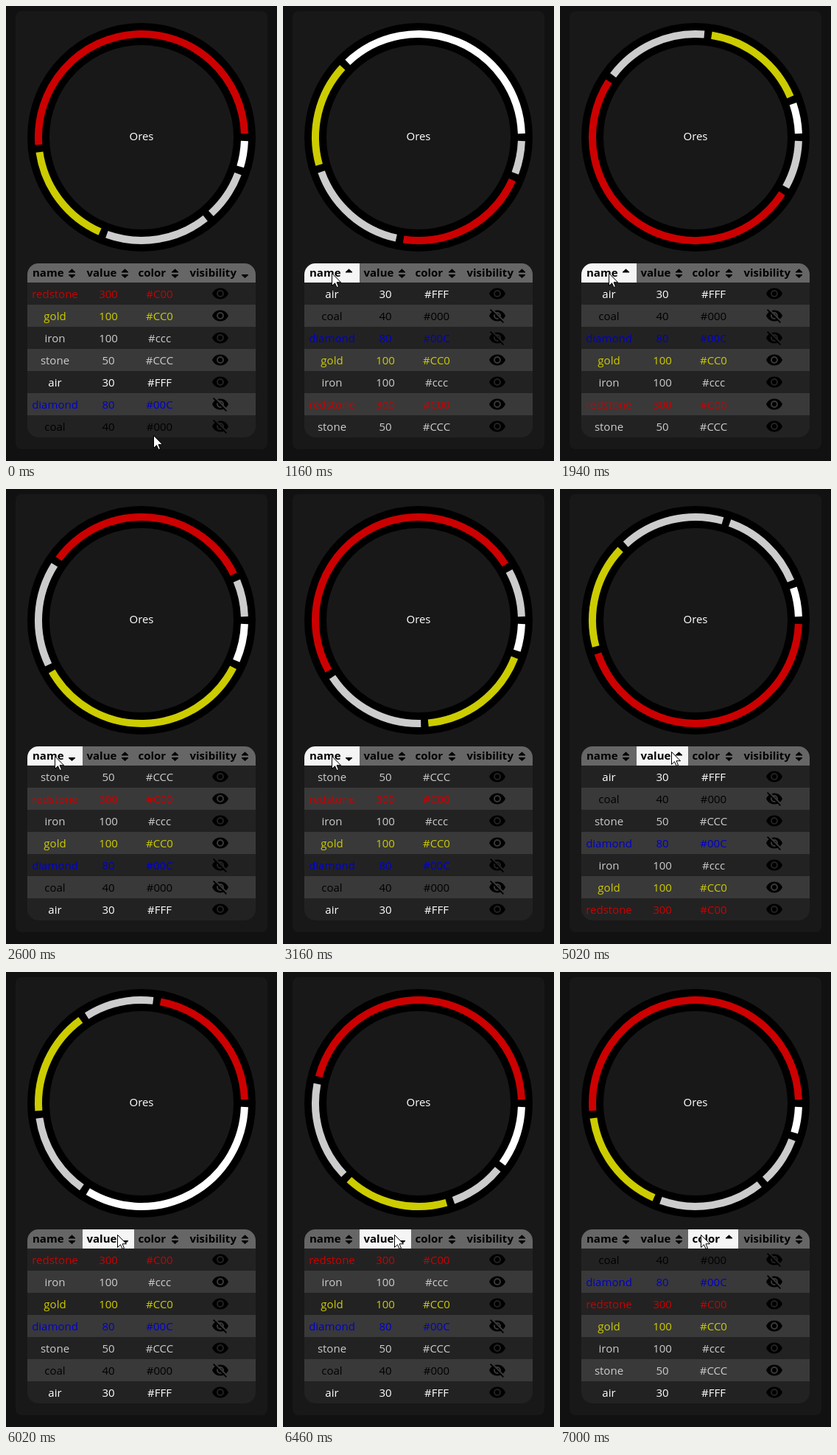
These frames come from a looping animation (368 px wide and 617 px high, 8 s). An HTML page:

```html
<!DOCTYPE html>
<html lang="en">
<head>
<meta charset="utf-8">
<title>Ores</title>
<style>
html, body { margin: 0; width: 100%; height: 100%; overflow: hidden; background: #111; }
svg { display: block; width: 368px; height: 617px; font: 15px "Open Sans", "Noto Sans", sans-serif; }
.mid { text-anchor: middle; }
.head { font-weight: 700; }
</style>
</head>
<body>
<svg id="stage" viewBox="0 0 368 617">
  <defs>
    <clipPath id="round"><rect x="29" y="349" width="310" height="236" rx="15"/></clipPath>
    <mask id="cut" maskUnits="userSpaceOnUse" x="0" y="0" width="24" height="24">
      <path d="M0 0H24V24H0Z" fill="#fff"/>
      <path d="M3 1.2L23.5 21.7" stroke="#000" stroke-width="2"/>
    </mask>
    <path id="eye" fill-rule="evenodd" d="M12 4.5C7 4.5 2.73 7.61 1 12c1.73 4.39 6 7.5 11 7.5s9.27-3.11 11-7.5C21.27 7.61 17 4.5 12 4.5ZM12 17a5 5 0 1 1 0-10a5 5 0 0 1 0 10ZM12 9a3 3 0 1 0 0 6a3 3 0 0 0 0-6Z"/>
    <g id="eyeOff">
      <use href="#eye" mask="url(#cut)"/>
      <path d="M2.6 3.6L20.4 21.4" stroke="#000" stroke-width="1.8"/>
    </g>
  </defs>
  <rect x="13" y="7" width="342" height="594" rx="8" fill="#181818"/>
  <circle cx="184" cy="178" r="140" fill="none" stroke="#000" stroke-width="30"/>
  <g id="ring" fill="none" stroke-width="10"></g>
  <text class="mid" x="184" y="182" fill="#fff">Ores</text>
  <g id="table" clip-path="url(#round)"></g>
  <path id="cursor" d="M0 0V17L4 13.2L6.6 19L9 18L6.5 12.2H12Z" fill="#fff" stroke="#000"/>
</svg>
<script>
const LOOP = 8000, DURATION = 1200, SHOWN = 5;

const ores = [
  ["redstone", 300, "#C00"], ["gold", 100, "#CC0"], ["iron", 100, "#ccc"],
  ["stone", 50, "#CCC"], ["air", 30, "#FFF"], ["diamond", 80, "#00C"], ["coal", 40, "#000"]
];
// label, left edge, right edge, text start, icon centre
const cols = [
  ["name", 29, 104, 36, 89.5], ["value", 104, 174, 109.5, 161.5],
  ["color", 174, 242, 179.5, 229.5], ["visibility", 242, 339, 249.5, 324.5]
];
// time, row order, sorted column, direction
const sorts = [
  [0, "0123456", 3, "down"],
  [926, "4651203", 0, "up"],
  [2263, "3021564", 0, "down"],
  [3485, "3021564", -1, ""],
  [4337, "4635210", 1, "up"],
  [5728, "0215364", 1, "down"],
  [6880, "6501234", 2, "up"]
];
const moves = [
  [0, 201, 583], [100, 158, 500], [200, 92, 397], [290, 67, 363],
  [3920, 118, 361], [4030, 145, 358], [4130, 152, 357],
  [6660, 170, 357], [6770, 192, 357]
];

const $ = id => document.getElementById(id);
function add(parent, tag, attrs, text) {
  const el = document.createElementNS("http://www.w3.org/2000/svg", tag);
  for (const k in attrs) el.setAttribute(k, attrs[k]);
  if (text !== undefined) el.textContent = text;
  return parent.appendChild(el);
}

const table = $("table");
const heads = cols.map(([label, left, right, x, icon]) => {
  const bg = add(table, "rect", { x: left, y: 349, width: right - left, height: 26 });
  add(table, "text", { class: "head", x, y: 367 }, label);
  const tri = d => add(table, "path", { d, "stroke": "#000", "stroke-linejoin": "round" });
  return {
    bg,
    up: tri(`M${icon - 4.5} 361L${icon} 357L${icon + 4.5} 361Z`),
    down: tri(`M${icon - 4.5} 364.5L${icon} 368.5L${icon + 4.5} 364.5Z`)
  };
});
ores.forEach((_, i) => add(table, "rect", {
  x: 29, y: 375 + i * 30, width: 310, height: 30, fill: i % 2 ? "#393939" : "#222"
}));
const rows = ores.map(([name, value, color], i) => {
  const g = add(table, "g", { fill: color });
  [name, value, color].forEach((s, c) =>
    add(g, "text", { class: "mid", x: [66.5, 139, 208.5][c], y: 21 }, s));
  add(g, "use", { href: i < SHOWN ? "#eye" : "#eyeOff", x: 0, y: 0, fill: "#000", transform: "translate(279 3)" });
  return g;
});
const arcs = Array.from({ length: SHOWN }, () => add($("ring"), "path", {}));

// the CSS "ease" curve
function ease(x) {
  if (x <= 0) return 0;
  if (x >= 1) return 1;
  let lo = 0, hi = 1;
  for (let i = 0; i < 24; i++) {
    const u = (lo + hi) / 2;
    if (0.75 * u * (1 - u) + u ** 3 < x) lo = u; else hi = u;
  }
  const v = 1 - lo;
  return 0.3 * lo * v * v + 3 * v * lo * lo + lo ** 3;
}

// the picture advances in ticks of about 110 ms
function tick(t) {
  if (t < 939) return t;
  const base = t < 3909 ? 950 : 3920;
  return base + Math.floor((t - base) / 110 + 0.1) * 110;
}

const visible = order => [...order].map(Number).filter(i => i < SHOWN);
const lastIndex = (list, t) => list.reduce((n, item, i) => item[0] <= t ? i : n, 0);

function point(angle) {
  const a = angle * Math.PI / 180;
  return (184 + 140 * Math.cos(a)).toFixed(2) + " " + (178 - 140 * Math.sin(a)).toFixed(2);
}

function drawRing(from, to, p) {
  const total = 580, pad = 2.05;
  let angle = 0;
  arcs.forEach((arc, i) => {
    const a = ores[from[i]][1], b = ores[to[i]][1];
    const span = (a + (b - a) * p) / total * 360;
    const large = span - 2 * pad > 180 ? 1 : 0;
    arc.setAttribute("d", `M${point(angle + pad)}A140 140 0 ${large} 0 ${point(angle + span - pad)}`);
    arc.setAttribute("stroke", ores[to[i]][2]);
    angle += span;
  });
}

function draw(t) {
  const now = tick(t);
  const n = lastIndex(sorts, now);
  const [start, order, col, dir] = sorts[n];
  const before = sorts[Math.max(0, n - 1)][1];
  drawRing(visible(before), visible(order), n ? ease((now - start) / DURATION) : 1);

  [...order].forEach((id, i) => rows[id].setAttribute("transform", `translate(0 ${375 + i * 30})`));

  const [, x, y] = moves[lastIndex(moves, now)];
  $("cursor").setAttribute("transform", `translate(${x - 0.5} ${y - 0.5})`);
  heads.forEach((h, i) => {
    const [, left, right] = cols[i];
    const hover = y >= 349 && y < 375 && x >= left && x < right;
    h.bg.setAttribute("fill", hover ? "#f5f5f5" : "#666");
    h.up.setAttribute("visibility", i === col && dir === "down" ? "hidden" : "visible");
    h.down.setAttribute("visibility", i === col && dir === "up" ? "hidden" : "visible");
  });
}

const begin = performance.now();
function frame() {
  draw((performance.now() - begin) % LOOP);
  requestAnimationFrame(frame);
}
draw(0);
requestAnimationFrame(frame);
</script>
</body>
</html>
```
